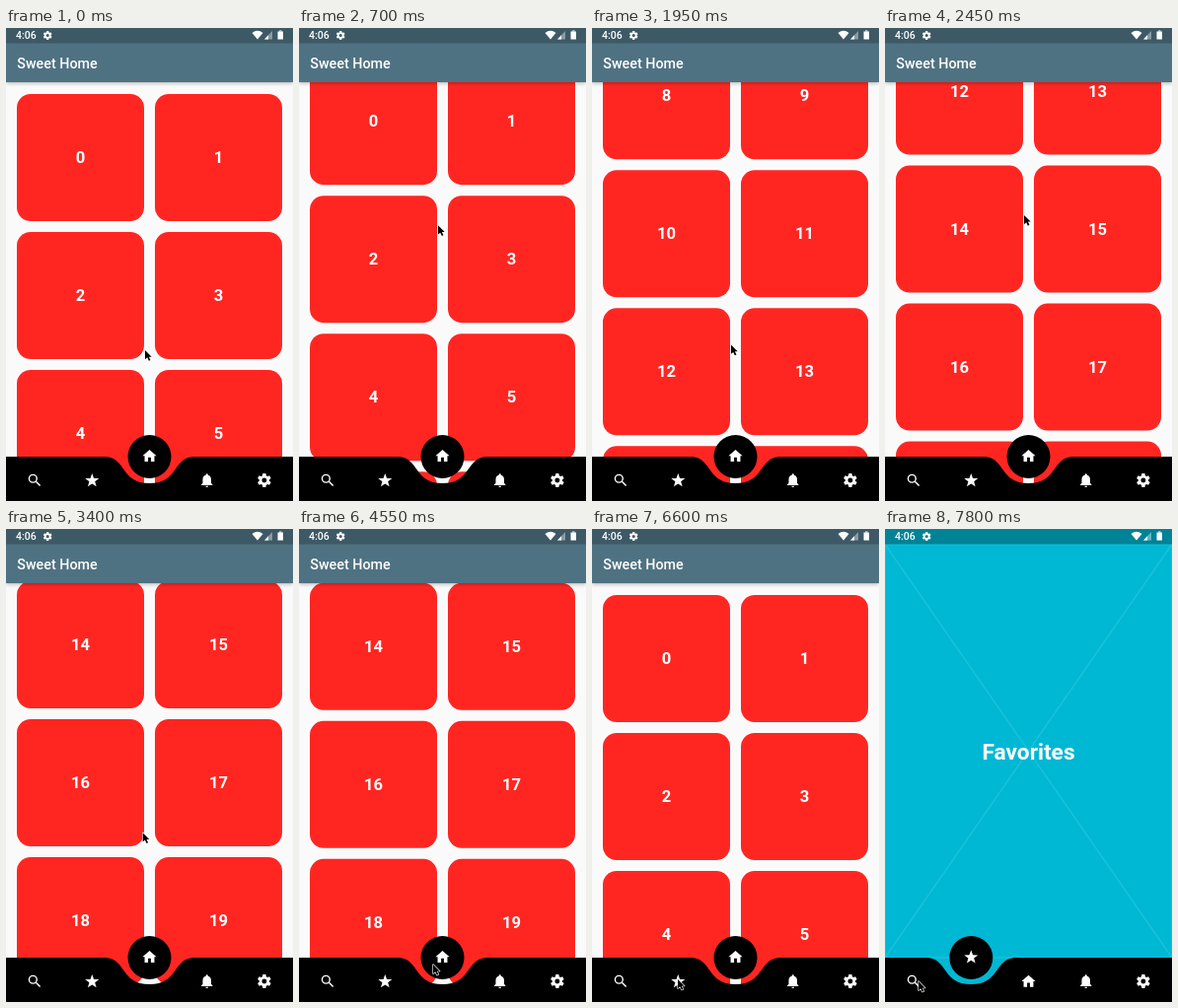
Recreate the animation shown at these times as an HTML page with a canvas. Size 291 px wide and 480 px high, loop 8000 ms.

```html
<!DOCTYPE html>
<html lang="en">
<head>
<meta charset="utf-8">
<style>
  html, body { margin: 0; width: 100%; height: 100%; overflow: hidden; }
  canvas { display: block; }
</style>
</head>
<body>
<canvas id="stage" width="291" height="480"></canvas>
<script>
const ctx = document.getElementById('stage').getContext('2d');
const W = 291, H = 480, LOOP = 8000, SLOT = W / 5;
const BAR_TOP = 435, BAR_H = H - BAR_TOP;
const PITCH = 140, CARD = 129, SCROLL_END = 994;
const HOME = 2, STAR = 1;
const START = 150, HOME_TAP = 4550, STAR_TAP = 6785;

const easeOut = p => 1 - (1 - p) ** 2;
const smooth = p => p * p * (3 - 2 * p);
const span = (t, start, length) => Math.min(1, Math.max(0, (t - start) / length));

// Repeats a tooth of [turn, radius] points around the middle of a 24 unit grid
function spokes(count, tooth, cy = 12) {
  const path = new Path2D();
  for (let i = 0; i < count; i++) {
    const middle = i * 2 * Math.PI / count - Math.PI / 2;
    for (const [turn, r] of tooth)
      path.lineTo(12 + r * Math.cos(middle + turn), cy + r * Math.sin(middle + turn));
  }
  path.closePath();
  return path;
}

function addCircle(path, x, y, r) {
  path.moveTo(x + r, y);
  path.arc(x, y, r, 0, 7);
  return path;
}

const gear = addCircle(spokes(6, [[-.38, 7.3], [-.22, 10], [.22, 10], [.38, 7.3]]), 12, 12, 3.5);
const star = spokes(5, [[0, 10.4], [Math.PI / 5, 4.3]], 12.5);
const home = new Path2D('M10 20v-6h4v6h5v-8h3L12 3 2 12h3v8z');
const bell = new Path2D('M10 20h4a2 2 0 0 1-4 0zM18 16l2 2v1H4v-1l2-2v-5q0-5 4.5-6.3V4a1.5 1.5 0 0 1 3 0v.7Q18 6 18 11z');
const search = new Path2D('M13.4 14.9L19 20.5 20.5 19 14.9 13.4z');
addCircle(addCircle(search, 9.5, 9.5, 6.5), 9.5, 9.5, 4.5);
const icons = [search, star, home, bell, gear];
const arrow = new Path2D('M0 0V10.5L2.5 8.3 4.4 12.2 6.2 11.3 4.4 7.6H7.6z');

function rect(color, x, y, w, h) {
  ctx.fillStyle = color;
  ctx.fillRect(x, y, w, h);
}

function fill(color, path) {
  ctx.fillStyle = color;
  ctx.fill(path, 'evenodd');
}

function text(value, x, y, size, weight = 700, align = 'center') {
  ctx.font = `${weight} ${size}px Roboto, sans-serif`;
  ctx.textAlign = align;
  ctx.fillStyle = '#fff';
  ctx.fillText(value, x, y);
}

function icon(path, x, y, size = 17, alpha = 1) {
  ctx.save();
  ctx.globalAlpha = alpha;
  ctx.translate(x - size / 2, y - size / 2);
  ctx.scale(size / 24, size / 24);
  fill('#fff', path);
  ctx.restore();
}

function drawStatus(color) {
  rect(color, 0, 0, W, 15.5);
  text('4:06', 10, 11.3, 10.5, 500, 'left');
  icon(gear, 42.2, 7.5, 11);
  fill('#fff', new Path2D('M249.5 5Q255 .5 260.5 5L255 11.5z'));
  fill('rgba(255,255,255,.4)', new Path2D('M262 11.5H270V3z'));
  fill('#fff', new Path2D('M262 11.5H266V7.2z'));
  rect('#fff', 275.5, 3.5, 5.5, 8);
  rect('#fff', 277, 2.5, 2.5, 1);
}

function drawHome(scroll) {
  rect('#fafafa', 0, 0, W, H);
  for (let i = 0; i < 20; i++) {
    const x = 11 + (i % 2) * PITCH, y = 67 + (i >> 1) * PITCH - scroll;
    ctx.fillStyle = '#ff2622';
    ctx.beginPath();
    ctx.roundRect(x, y, CARD, CARD, 14);
    ctx.fill();
    text(i, x + CARD / 2, y + 70, 16.6);
  }
  ctx.save();
  ctx.shadowColor = 'rgba(0,0,0,.3)';
  ctx.shadowBlur = 4;
  ctx.shadowOffsetY = 1;
  rect('#4f7282', 0, 0, W, 55);
  ctx.restore();
  text('Sweet Home', 11.3, 41, 14.3, 500, 'left');
  drawStatus('#3e5966');
}

function drawFavorites() {
  rect('#00b8d4', 0, 0, W, H);
  ctx.strokeStyle = '#1ac1da';
  ctx.lineWidth = 1.4;
  ctx.stroke(new Path2D('M0 15.5H291V435H0zL291 435M291 15.5L0 435'));
  text('Favorites', W / 2, 234, 22.7);
  drawStatus('#008297');
}

function drawNav(p) {
  const slot = HOME + (STAR - HOME) * p;
  const center = (slot + .5) * SLOT;
  const buttonY = BAR_TOP + 56 * (1 - Math.abs(1 - 2 * p));
  fill('#000', addCircle(new Path2D(), center, buttonY, 22));
  icon(icons[p < .5 ? HOME : STAR], center, buttonY - .7);

  const at = f => center + f * W, shoulder = BAR_TOP + BAR_H * .05, dip = BAR_TOP + BAR_H * .6;
  const bar = new Path2D();
  bar.moveTo(0, BAR_TOP);
  bar.lineTo(at(-.15), BAR_TOP);
  bar.bezierCurveTo(at(-.08), shoulder, at(-.1), dip, center, dip);
  bar.bezierCurveTo(at(.1), dip, at(.08), shoulder, at(.15), BAR_TOP);
  bar.lineTo(W, BAR_TOP);
  bar.lineTo(W, H);
  bar.lineTo(0, H);
  fill('#000', bar);

  icons.forEach((path, i) => {
    const away = Math.min(1, Math.abs(i - slot));
    if (away > 0) icon(path, (i + .5) * SLOT, 459 + (1 - away) * 28, 17, away);
  });
}

function scrollAt(t) {
  const down = smooth(span(t, START, 2664) ** 1.369);
  const toTop = easeOut(span(t, HOME_TAP, 1100));
  return SCROLL_END * down * (1 - toTop);
}

// The pointer swipes up and down, then visits the home button, the list, the star and search
function cursorAt(t) {
  const swipe = 930, swipes = 2.5 * swipe;
  const turn = span(t, START, swipes) * 2.5 * 2 * Math.PI;
  let x = 141, y = 258 + 69 * Math.cos(turn);
  const visits = [[START + swipes, 4400, 136, 442], [4600, 5150, 161, 226],
    [5200, 6600, 87, 457], [7250, 7800, 34, 459]];
  for (const [from, to, tx, ty] of visits) {
    const p = smooth(span(t, from, to - from));
    x += (tx - x) * p;
    y += (ty - y) * p;
  }
  return [x, y];
}

function drawCursor([x, y]) {
  ctx.save();
  ctx.translate(x, y);
  ctx.scale(.88, .88);
  ctx.lineWidth = 1.4;
  ctx.lineJoin = 'round';
  ctx.strokeStyle = '#fff';
  ctx.stroke(arrow);
  fill('#000', arrow);
  ctx.restore();
}

function draw(now) {
  const t = now % LOOP;
  if (t < STAR_TAP) drawHome(scrollAt(t));
  else drawFavorites();
  drawNav(easeOut(span(t, STAR_TAP, 300)));
  drawCursor(cursorAt(t));
  requestAnimationFrame(draw);
}
requestAnimationFrame(draw);
</script>
</body>
</html>
```
